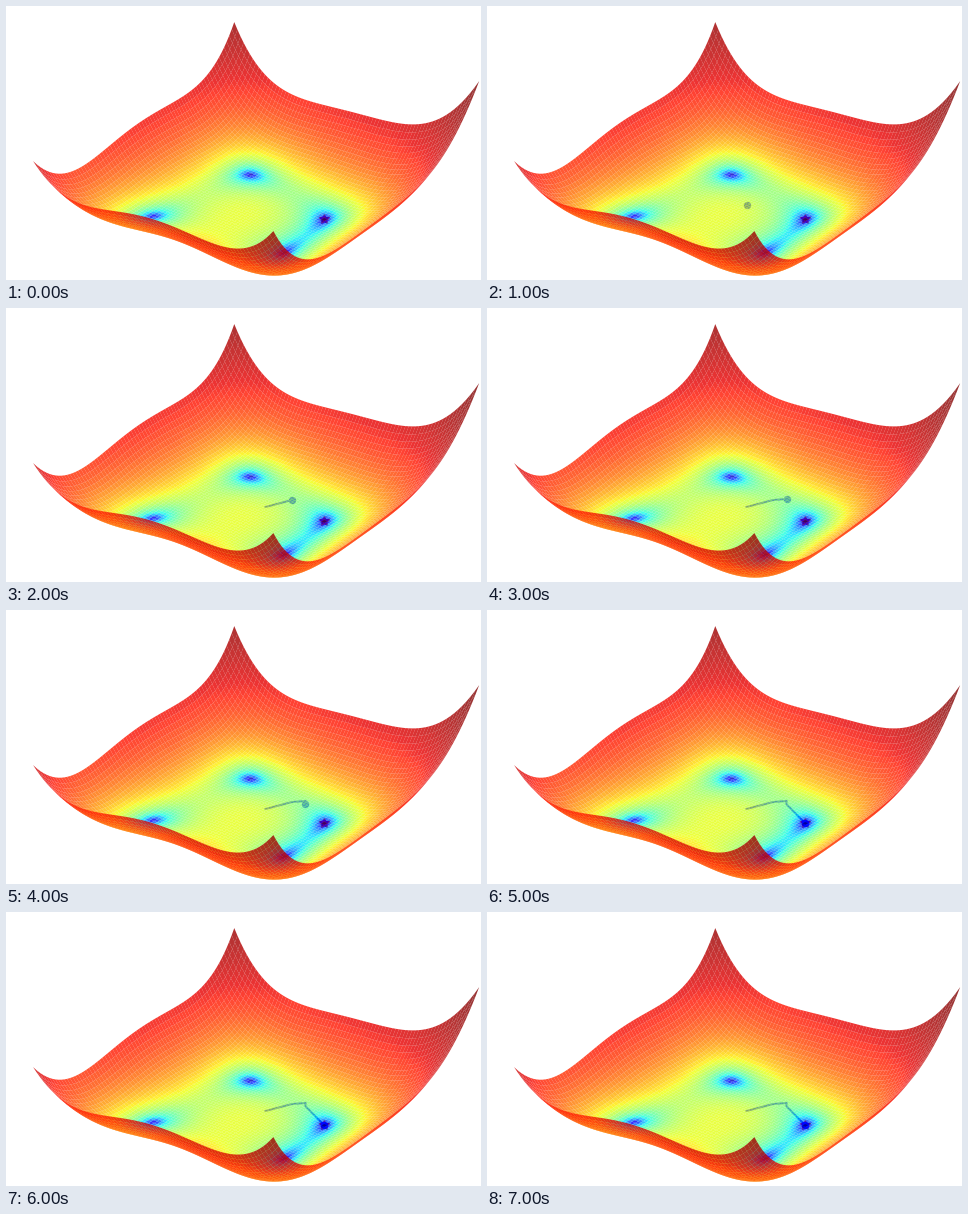
A matplotlib script for the animation above (8 s loop, 475 by 274 pixels).

```python
import numpy as np
import matplotlib.pyplot as plt
from matplotlib.animation import FuncAnimation
from matplotlib.collections import PolyCollection
from matplotlib.colors import LogNorm

W, H, DPI = 475, 274, 100
LIMIT, STEP = 7.5, 0.2
AZIM, ELEV, DIST = np.radians(-50), np.radians(50), 10
CENTER = np.array([246.9, 149.3])
SCALE = np.array([3102, -1945])


def himmelblau(x, y):
    return (x**2 + y - 11)**2 + (x + y**2 - 7)**2


def project(x, y, z, z_max):
    """Perspective view of the unit cube: pixel x, pixel y, depth."""
    u, v, w = x / (2 * LIMIT), y / (2 * LIMIT), z / z_max - 0.5
    right = -u * np.sin(AZIM) + v * np.cos(AZIM)
    near = u * np.cos(AZIM) + v * np.sin(AZIM)
    up = w * np.cos(ELEV) - near * np.sin(ELEV)
    depth = DIST - near * np.cos(ELEV) - w * np.sin(ELEV)
    px = CENTER[0] + SCALE[0] * right / depth
    py = CENTER[1] + SCALE[1] * up / depth
    return px, py, depth


def cell_corners(a):
    """The four corner values of every grid cell, in drawing order."""
    corners = a[:-1, :-1], a[:-1, 1:], a[1:, 1:], a[1:, :-1]
    return np.stack([c.ravel() for c in corners], axis=1)


fig = plt.figure(figsize=(W / DPI, H / DPI), dpi=DPI, facecolor="white")
ax = fig.add_axes([0, 0, 1, 1])
ax.set_xlim(0, W)
ax.set_ylim(H, 0)
ax.axis("off")

# Surface, painted from the farthest cell to the nearest
ticks = np.linspace(-LIMIT, LIMIT, round(2 * LIMIT / STEP) + 1)
gx, gy = np.meshgrid(ticks, ticks)
gz = himmelblau(gx, gy)
px, py, depth = project(gx, gy, gz, gz.max())
order = np.argsort(-cell_corners(depth).mean(axis=1))
cells = np.stack([cell_corners(px), cell_corners(py)], axis=2)[order]
heights = cell_corners(gz).mean(axis=1)[order]
surface = PolyCollection(cells, cmap="jet", norm=LogNorm(), alpha=0.8,
                         edgecolors="none", linewidths=0, zorder=3)
surface.set_array(heights)
ax.add_collection(surface)

# The minimum and the descent steps shine through the translucent surface
goal = project(3, 2, 0, gz.max())[:2]
ax.plot(*goal, "*", color="red", ms=7.2, zorder=1)
steps = np.array([(259.5, 199), (286, 192), (299.7, 191), (299.3, 194),
                  goal, goal, goal])
trail, = ax.plot([], [], color="blue", lw=1.4, zorder=2)
dot, = ax.plot([], [], "o", color="blue", ms=4.3, zorder=2)


def update(i):
    trail.set_data(steps[:i, 0], steps[:i, 1])
    dot.set_data(steps[:i, 0][-1:], steps[:i, 1][-1:])
    return trail, dot


anim = FuncAnimation(fig, update, frames=8, interval=1000, repeat=True,
                     repeat_delay=0, blit=False)
plt.show()
```
